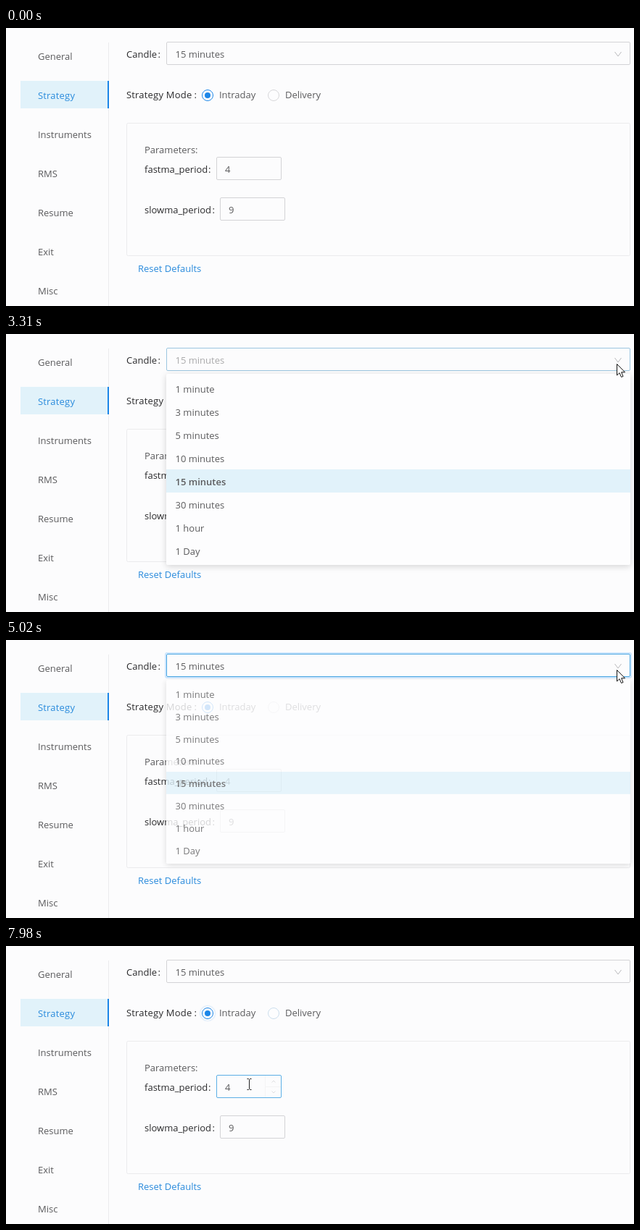
An HTML page for the animation above (8000 ms loop, 866 by 384 pixels).

```html
<!DOCTYPE html>
<html lang="en">
<head>
<meta charset="utf-8">
<title>Strategy settings</title>
<style>
html, body { margin: 0; width: 100%; height: 100%; overflow: hidden; background: #fcfcfd; }
svg { display: block; }
text { font: 13px "Open Sans", "Noto Sans", sans-serif; fill: #5b5b5d; white-space: pre; }
.label { fill: #2b2b2d; }
.link { fill: #2a8bdc; }
.wide { letter-spacing: .2px; }
.bold { font-weight: 600; }
.line { fill: none; stroke: #ebebed; }
.box { fill: #fcfcfd; stroke: #d3d3d6; }
.tint { fill: #e1f2fa; }
.blue { fill: #1c86e8; }
.ring { fill: #fdfdfe; stroke: #1c86e8; }
.chevron { fill: none; stroke: #b9b9bc; }
.pen { stroke: #111; fill: #fff; stroke-linejoin: round; }
.beam { fill: none; stroke: #222; }

.anim { animation: 8s linear infinite; }
.cursor { animation-name: travel; }
.arrow { animation-name: arrow; animation-timing-function: step-end; }
.hand { animation-name: hand; animation-timing-function: step-end; }
.ibeam { animation-name: ibeam; animation-timing-function: step-end; }
.select { animation-name: select; }
.focus { animation-name: focus; fill: none; stroke: rgba(24, 144, 255, .2); stroke-width: 2; }
.value { animation-name: dim; }
.menu { animation-name: menu; transform-origin: 0 55px; }
.sheet { fill: #fdfdfe; filter: drop-shadow(0 2px 4px rgba(0, 0, 0, .16)); }
.intraday { animation-name: intraday; }
.delivery { animation-name: delivery; }
.delivery-ring { animation-name: delivery-ring; }
.pulse { fill: none; stroke: #1c86e8; transform-box: fill-box; transform-origin: center; }
.pulse-a { animation-name: pulse-a; }
.pulse-b { animation-name: pulse-b; }
.field { animation-name: field; }
.spin { animation-name: spin; }
.glow { animation-name: glow; animation-timing-function: step-end; }

@keyframes travel {
  0%, 3.625% { transform: translate(455px, 386px); animation-timing-function: cubic-bezier(.4, 0, .3, 1); }
  12.9%, 13.875% { transform: translate(543px, 31px); animation-timing-function: ease-in-out; }
  22.75%, 69.75% { transform: translate(842px, 41px); animation-timing-function: ease-in-out; }
  79.5%, 82% { transform: translate(371px, 102px); animation-timing-function: ease-out; }
  84.5% { transform: translate(291px, 92px); animation-timing-function: ease-in-out; }
  88%, 96.4% { transform: translate(275px, 85px); animation-timing-function: ease-in-out; }
  98.8%, 100% { transform: translate(335px, 191px); }
}
@keyframes arrow {
  0% { opacity: 0; }
  3.625% { opacity: 1; }
  11% { opacity: 0; }
  25% { opacity: 1; }
  77.5%, 100% { opacity: 0; }
}
@keyframes hand {
  0% { opacity: 0; }
  11% { opacity: 1; }
  25% { opacity: 0; }
  77.5% { opacity: 1; }
  98% { opacity: 0; }
  100% { opacity: 0; }
}
@keyframes ibeam {
  0% { opacity: 0; }
  98%, 100% { opacity: 1; }
}
@keyframes select {
  0%, 12.75% { stroke: #d3d3d6; }
  16.5%, 38.5% { stroke: #4aa6e2; }
  42.25%, 49.125% { stroke: #b4cfdf; }
  52.875%, 80.25% { stroke: #4aa6e2; }
  84%, 100% { stroke: #d3d3d6; }
}
@keyframes focus {
  0%, 49.125% { opacity: 0; }
  52.875%, 80.25% { opacity: 1; }
  84%, 100% { opacity: 0; }
}
@keyframes dim {
  0%, 38.75% { opacity: 1; }
  42%, 60.888% { opacity: .4; }
  62.5%, 100% { opacity: 1; }
}
@keyframes menu {
  0%, 38.75% { opacity: 0; transform: scaleY(.8); animation-timing-function: cubic-bezier(.23, 1, .32, 1); }
  41.25%, 60.888% { opacity: 1; transform: none; animation-timing-function: cubic-bezier(.755, .05, .855, .06); }
  63.388%, 100% { opacity: 0; transform: scaleY(.8); }
}
@keyframes intraday {
  0%, 82% { opacity: 1; }
  84%, 96.25% { opacity: 0; }
  98.5%, 100% { opacity: 1; }
}
@keyframes delivery {
  0%, 82% { opacity: 0; }
  84%, 96.25% { opacity: 1; }
  98.5%, 100% { opacity: 0; }
}
@keyframes delivery-ring {
  0%, 78.5% { stroke: #d6d6d9; }
  82%, 96.25% { stroke: #1c86e8; }
  99.8%, 100% { stroke: #ccdeec; }
}
@keyframes pulse-a {
  0%, 96.24% { opacity: 0; transform: none; }
  96.25% { opacity: .5; transform: none; animation-timing-function: ease-out; }
  100% { opacity: .1; transform: scale(1.4); }
}
@keyframes pulse-b {
  0%, 81.99% { opacity: 0; transform: none; }
  82% { opacity: .5; transform: none; animation-timing-function: ease-out; }
  86.5%, 100% { opacity: 0; transform: scale(1.6); }
}
@keyframes field {
  0%, 97.8% { stroke: #d3d3d6; }
  99.6%, 100% { stroke: #5cafe6; }
}
@keyframes spin {
  0%, 98% { opacity: 0; }
  100% { opacity: .5; }
}
@keyframes glow {
  0% { opacity: 0; }
  27% { opacity: 1; }
  31.5% { opacity: 0; }
  59.5% { opacity: 1; }
  60.888% { opacity: 0; }
  80.25% { opacity: 1; }
  82% { opacity: 0; }
  94% { opacity: 1; }
  96.25%, 100% { opacity: 0; }
}
</style>
</head>
<body>
<svg width="866" height="384" viewBox="0 0 866 384">
  <defs>
    <radialGradient id="halo">
      <stop offset="0" stop-color="#fffbd0" stop-opacity=".55"/>
      <stop offset=".5" stop-color="#fdf7b4" stop-opacity=".7"/>
      <stop offset=".68" stop-color="#f9ee82" stop-opacity=".9"/>
      <stop offset=".92" stop-color="#fbf29a" stop-opacity=".9"/>
      <stop offset="1" stop-color="#fdf8c8" stop-opacity=".6"/>
    </radialGradient>
  </defs>

  <path class="line" d="M141.5 20V384"/>
  <rect class="tint" x="20" y="73" width="121" height="38"/>
  <rect class="blue" x="140" y="73" width="2" height="38"/>
  <g id="nav"></g>

  <text class="label" x="166" y="41">Candle</text>
  <text class="label" x="209.5" y="41">:</text>
  <rect class="focus anim" x="220" y="18" width="642" height="34" rx="2"/>
  <rect class="box select anim" x="221.5" y="19.5" width="639" height="31" rx="1.5"/>
  <text class="value anim" x="233.5" y="41">15 minutes</text>
  <path class="chevron" d="M839.5 33l4.5 6 4.5-6"/>

  <text class="label wide" x="166" y="97">Strategy Mode</text>
  <text class="label" x="259.5" y="97">:</text>
  <circle class="pulse pulse-a anim" cx="278" cy="93" r="7.5"/>
  <circle class="ring" cx="278" cy="93" r="7.5"/>
  <circle class="blue intraday anim" cx="278" cy="93" r="4"/>
  <text x="294" y="97">Intraday</text>
  <circle class="pulse pulse-b anim" cx="369" cy="93" r="7.5"/>
  <circle class="ring delivery-ring anim" cx="369" cy="93" r="7.5"/>
  <circle class="blue delivery anim" cx="369" cy="93" r="4"/>
  <text x="385" y="97">Delivery</text>

  <rect class="line" x="166.5" y="131.5" width="694" height="183" rx="2"/>
  <text x="191" y="173">Parameters:</text>
  <text class="label" x="191" y="200">fastma_period</text>
  <text class="label" x="279" y="200">:</text>
  <rect class="box field anim" x="290.5" y="178.5" width="89" height="31" rx="1.5"/>
  <text x="302" y="200">4</text>
  <g class="spin anim">
    <path class="line" d="M357.5 179V209M358 194.5H379"/>
    <path class="chevron" d="M366.500 188.500l2.500-2.500 2.500 2.500M366.500 200.500l2.500 2.500 2.500-2.500"/>
  </g>
  <text class="label" x="191" y="256">slowma_period</text>
  <text class="label" x="284.5" y="256">:</text>
  <rect class="box" x="295.5" y="234.500" width="89" height="31" rx="1.5"/>
  <text x="307" y="256">9</text>
  <text class="link" x="182" y="337">Reset Defaults</text>

  <g class="menu anim">
    <rect class="sheet" x="221" y="55" width="640" height="264" rx="2"/>
    <rect class="tint" x="221" y="187" width="640" height="32"/>
    <g id="items"></g>
  </g>

  <g class="cursor anim">
    <circle class="glow anim" r="19.5" fill="url(#halo)"/>
    <path class="pen arrow anim" d="M.5.5V16L4 12.700 6.500 18.500 9 17.500 6.600 11.800H11.500Z"/>
    <g class="pen hand anim">
      <path d="M-2 2a2 2 0 0 1 4 0v6a1.800 1.800 0 0 1 3.400.6a1.700 1.700 0 0 1 3 .7a1.500 1.500 0 0 1 2.600 1V15q0 4-2 7.500H0Q-1 19.500-4 16.500L-6 14a1.700 1.700 0 0 1 2.500-2.200L-2 13.500Z"/>
      <path d="M2 8v4M5.400 9v3.500M8.400 10v3"/>
    </g>
    <path class="beam ibeam anim" d="M-2.500-7.500H-.5L.5-6.500 1.500-7.500H3.500M.5-6.500V6.500M-2.500 7.500H-.5L.5 6.500 1.500 7.500H3.500"/>
  </g>
</svg>
<script>
function addList(id, labels, x, y, step, active, style) {
  const group = document.getElementById(id);
  labels.forEach((label, i) => {
    const text = document.createElementNS(group.namespaceURI, "text");
    text.setAttribute("x", x);
    text.setAttribute("y", y + i * step);
    if (i === active) text.setAttribute("class", style);
    text.textContent = label;
    group.append(text);
  });
}
addList("nav", ["General", "Strategy", "Instruments", "RMS", "Resume", "Exit", "Misc"],
  44, 44, 54, 1, "link wide");
addList("items", ["1 minute", "3 minutes", "5 minutes", "10 minutes", "15 minutes", "30 minutes", "1 hour", "1 Day"],
  233.5, 81, 32, 4, "bold");
</script>
</body>
</html>
```
